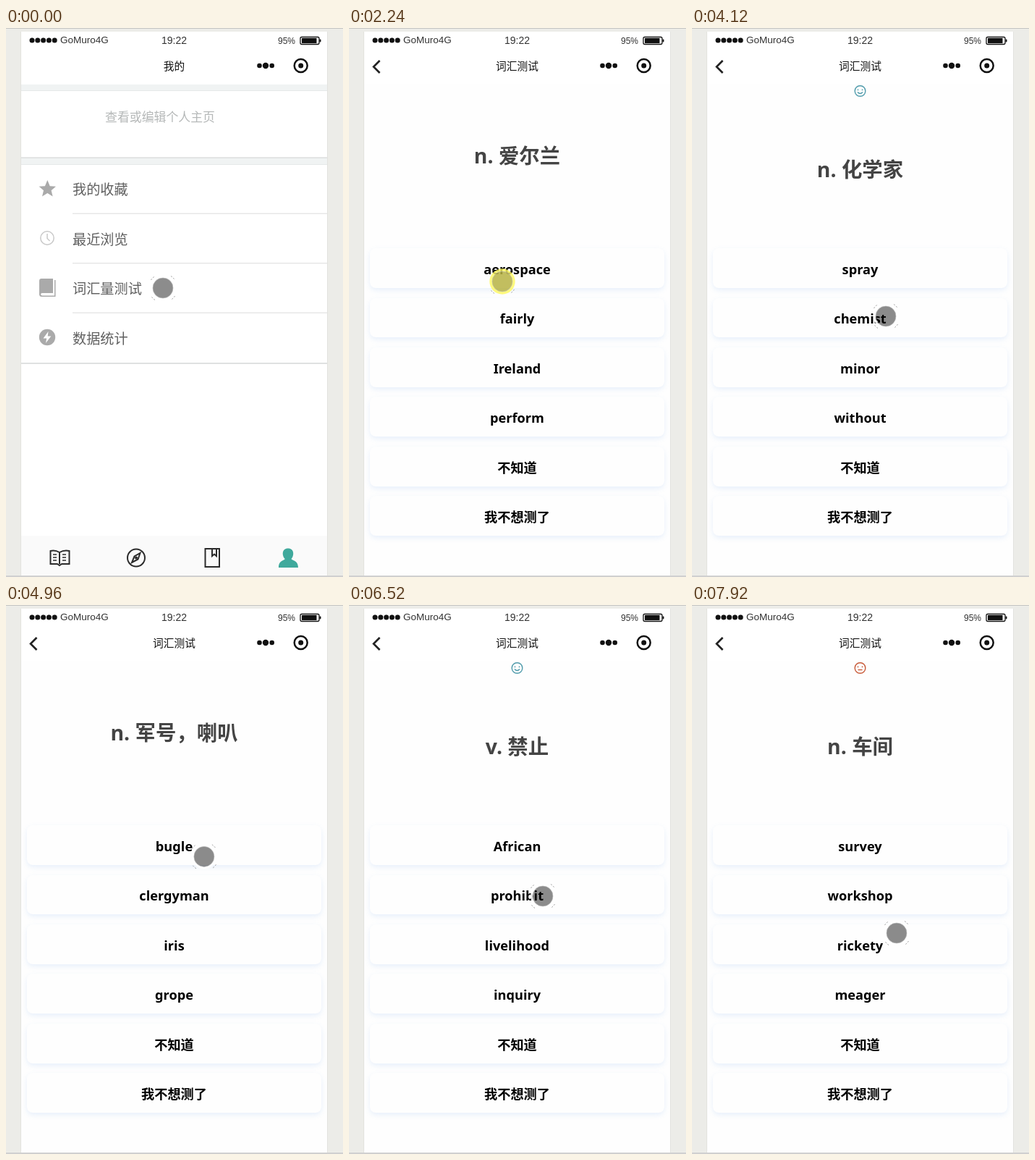
These frames come from a looping animation (466 px wide and 758 px high, 8 s). An HTML page:

```html
<!DOCTYPE html>
<html lang="zh-CN">
<head>
<meta charset="utf-8">
<title>词汇测试</title>
<style>
  html, body { margin: 0; width: 100%; height: 100%; overflow: hidden; background: #ecece8; }
  #stage { position: relative; width: 466px; height: 758px; overflow: hidden; }
  #stage > svg { position: absolute; left: 0; top: 0; }
  text { font-family: "Noto Sans CJK SC", sans-serif; }
  .latin { font-family: "Liberation Sans", Arial, sans-serif; fill: #333; }
  .row { font-size: 19.2px; fill: #606060; }
  .title { font-size: 14.7px; fill: #111; text-anchor: middle; }
  #screen { position: absolute; left: 21px; top: 78px; width: 423px; height: 678px; overflow: hidden; }
  #quiz { position: absolute; inset: 0; background: #fefefe; text-align: center;
    font-family: "Noto Sans", "Open Sans", "Noto Sans CJK SC", sans-serif; font-weight: 700; }
  #word { position: absolute; left: 0; width: 100%; top: 78px; font-size: 28.4px; line-height: 40px; color: #444; }
  #face { position: absolute; left: 203px; top: 0; }
  #options { position: absolute; left: 8px; right: 8px; top: 226.3px; }
  #options div { box-sizing: border-box; padding: 15.8px 0 11.5px; margin-bottom: 13.7px;
    font-size: 18.2px; line-height: 27.4px; color: #000; border-radius: 8px; background: #fefefe;
    box-shadow: 0 3px 7px rgba(110, 160, 235, .15); }
</style>
</head>
<body>
<div id="stage">
  <svg width="466" height="758">
    <path d="M0 .5H466" stroke="#c4c4c2"/>
    <path d="M0 757H466" stroke="#d0d0d0" stroke-width="2"/>
    <path d="M20.5 5V756M444.500 5V756" stroke="#e3e3df"/>
    <rect x="21" y="5" width="423" height="751" fill="#fff"/>

    <g fill="#111">
      <g id="signal"></g>
      <rect x="407" y="12.500" width="26" height="10" rx="2" fill="none" stroke="#111" stroke-width="1.300"/>
      <rect x="409" y="14" width="20.500" height="7" rx=".5"/>
      <rect x="433.500" y="15.500" width="2" height="4" rx="1"/>
    </g>
    <text class="latin" x="75" y="21" font-size="13.500">GoMuro4G</text>
    <text class="latin" x="215" y="21.500" font-size="14">19:22</text>
    <text class="latin" x="376" y="21.500" font-size="12">95%</text>

    <text class="title" id="title" x="232.500" y="57.600"></text>
    <path id="back" d="M42.500 45L34 53.500L42.500 62" fill="none" stroke="#222" stroke-width="2.600"/>
    <g fill="#111">
      <circle cx="350.500" cy="52" r="3.300"/><circle cx="359" cy="52" r="4.200"/><circle cx="367.700" cy="52" r="3.300"/>
      <circle cx="407.700" cy="52" r="3.500"/>
      <circle cx="407.700" cy="52" r="9" fill="none" stroke="#111" stroke-width="2.500"/>
    </g>

    <g fill="#f0f3f3"><rect x="21" y="78" width="423" height="9"/><rect x="21" y="180" width="423" height="9"/></g>
    <path d="M21 179.200H444M21 463H444" stroke="#dfe1e1" stroke-width="1.800"/>
    <path d="M21 188.500H444M21 86.500H444" stroke="#e6e9e9"/>
    <path d="M92 256.300H444M92 324.800H444M92 393.300H444" stroke="#e7e7e7" stroke-width="1.500"/>
    <text x="137" y="129.300" font-size="16.900" fill="#b5b8b8">查看或编辑个人主页</text>
    <text class="row" x="92" y="230.300">我的收藏</text>
    <text class="row" x="92" y="298.600">最近浏览</text>
    <text class="row" x="92" y="367.300">词汇量测试</text>
    <text class="row" x="92" y="435.800">数据统计</text>

    <path d="M57.300 210L60.700 218.200L69 218.800L62.600 224.300L64.600 232.500L57.300 228L50 232.500L52 224.300L45.600 218.800L53.900 218.200Z" fill="#aaa"/>
    <g fill="none" stroke="#c9c9c9" stroke-width="1.500"><circle cx="57" cy="290" r="9.200"/><path d="M57 284V290.500L60.500 294"/></g>
    <path d="M49 346H65V366H50Q48 366 48 367.500T50 369.500H67V348H68.500V371H49.500Q46 371 46 367.500V349Q46 346 49 346Z" fill="#aaa"/>
    <circle cx="57" cy="427" r="11.200" fill="#aaa"/>
    <path d="M58.500 419L51.500 428.500H56.200L55 435L62.300 425.500H57.700Z" fill="#fff"/>

    <g id="tabs">
      <rect x="21" y="701" width="423" height="55" fill="#fafafa"/>
      <g fill="none" stroke="#2b2b2b" stroke-width="2">
        <path d="M74 724Q68 720.500 61.500 722V740H71L74 742L77 740H87.500V722Q80 720.500 74 724V740"/>
        <path d="M65 727H70M65 731H70M65 735H70M78 727H83M78 731H83M78 735H83" stroke-width="1.600"/>
        <circle cx="180" cy="731.500" r="12"/>
        <path d="M185.500 725L182.500 733.500L174 738L177.500 729.500Z"/><circle cx="180" cy="731.500" r="1"/>
        <path d="M275.500 719H295V744H275.500ZM285 719V729L288 726.500L291 729V719"/>
      </g>
      <path d="M390 718.500C399 718.500 398.500 729 394.500 733C396 735.500 404 735 404 745H377C377 735 384.500 735.500 385.800 733C381.500 729 381 718.500 390 718.500Z" fill="#3fa99c"/>
    </g>
  </svg>

  <div id="screen">
    <div id="quiz">
      <div id="word"></div>
      <svg id="face" width="17" height="18" fill="none" stroke-width="1.400">
        <circle cx="8.500" cy="9" r="7.300"/>
        <path d="M5.500 6.500V8.200M11.500 6.500V8.200"/>
        <path id="mouth"/>
      </svg>
      <div id="options"></div>
    </div>
  </div>

  <svg width="466" height="758">
    <g id="cursor">
      <circle id="glow" r="17.700" fill="#fff95e" fill-opacity=".8"/>
      <circle id="ring" r="15.500" fill="none" stroke="#fff" stroke-width="3" stroke-opacity=".9"/>
      <circle id="disc" r="14" stroke="#bbb" stroke-opacity=".6"/>
      <g id="ticks" fill="none" stroke="#999" stroke-dasharray="2 2"></g>
    </g>
  </svg>
</div>

<script>
const LOOP = 8000;
const $ = id => document.getElementById(id);

$("signal").innerHTML = [0, 1, 2, 3, 4].map(i => `<circle cx="${36 + i * 7.8}" cy="17" r="3.500"/>`).join("");
$("ticks").innerHTML = [0, 90, 180, 270]
  .map(a => `<path transform="rotate(${a})" d="M-16.500 -11A20 20 0 0 1 -11 -16.500"/>`).join("");

// Start time, heading, the four choices
const questions = [
  [0, "", ["", "", "", ""]],
  [1480, "n. 爱尔兰", ["aerospace", "fairly", "Ireland", "perform"]],
  [3980, "n. 化学家", ["spray", "chemist", "minor", "without"]],
  [4731, "n. 军号，喇叭", ["bugle", "clergyman", "iris", "grope"]],
  [5820, "v. 禁止", ["African", "prohibit", "livelihood", "inquiry"]],
  [7140, "n. 车间", ["survey", "workshop", "rickety", "meager"]]
];

// Start, end, correct answer
const faces = [
  [3340, 3810, true], [4120, 4577, true], [5190, 5660, true], [6520, 6980, true], [7450, LOOP, false]
];

// Left offset of the quiz page over time
const slides = [[0, 423], [1070, 387], [1170, 200], [1240, 60], [1310, 0]];

// First step, last step, step count, destination
const moves = [
  [70, 140, 2, 209, 331],
  [310, 385, 2, 205, 348],
  [460, 460, 1, 207, 354],
  [2240, 2240, 1, 212, 350],
  [2330, 2640, 5, 242, 443],
  [2790, 3190, 6, 238, 477],
  [3570, 3810, 4, 268, 398],
  [4500, 5040, 8, 275, 338],
  [5350, 5740, 6, 264, 566],
  [5820, 5820, 1, 264, 575],
  [5970, 6200, 4, 267, 400],
  [6370, 6370, 1, 268, 402],
  [6980, 7300, 5, 290, 338],
  [7520, 7920, 6, 283, 453]
];

const current = (list, t) => list.filter(item => item[0] <= t).pop();

function cursorAt(t) {
  let x = 217, y = 359;
  for (const [start, end, n, toX, toY] of moves) {
    if (t < start) break;
    const gap = (end - start) / (n - 1 || 1) || 1;
    const p = Math.min(n, Math.floor((t - start) / gap + 0.001) + 1) / n;
    const e = p * p * (3 - 2 * p);
    x += (toX - x) * e;
    y += (toY - y) * e;
  }
  return [x, y];
}

function show(el, on) {
  el.style.display = on ? "" : "none";
}

let shown;
function setQuestion(q) {
  if (q === shown) return;
  shown = q;
  $("word").textContent = q[1];
  $("options").innerHTML = [...q[2], "不知道", "我不想测了"].map(s => `<div>${s}</div>`).join("");
}

function draw(t) {
  const opened = t >= 690;
  $("title").textContent = opened ? "词汇测试" : "我的";
  show($("back"), opened);
  show($("tabs"), !opened);

  const left = current(slides, t)[1];
  show($("quiz"), left < 423);
  $("quiz").style.transform = `translateX(${left}px)`;
  setQuestion(current(questions, t));

  const face = faces.find(([start, end]) => t >= start && t < end);
  show($("face"), face);
  $("word").style.top = face ? "97px" : "78px";
  if (face) {
    $("face").setAttribute("stroke", face[2] ? "#4f9bab" : "#c85a38");
    $("mouth").setAttribute("d", face[2] ? "M5 10.500Q8.500 14.500 12 10.500" : "M5.500 11.500H11.500");
  }

  const pressed = t >= 2240 && t < 2330;
  show($("glow"), pressed);
  show($("ring"), !pressed);
  $("disc").setAttribute("fill-opacity", pressed ? 0.24 : 0.45);
  $("cursor").setAttribute("transform", `translate(${cursorAt(t)})`);
}

const began = performance.now();
function tick() {
  draw((performance.now() - began) % LOOP);
  requestAnimationFrame(tick);
}
tick();
</script>
</body>
</html>
```
